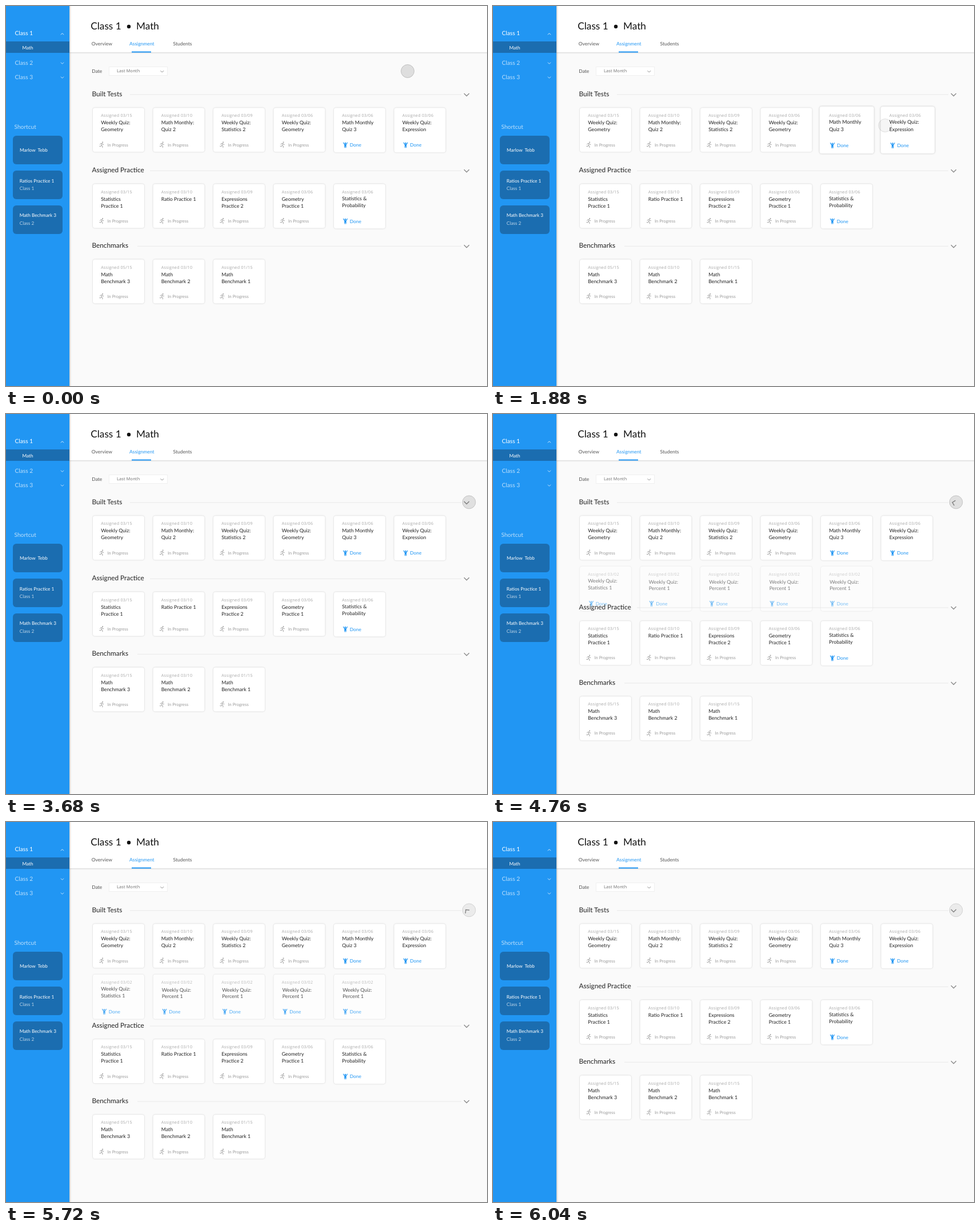
An HTML page that plays this animation: 842 by 665 pixels, repeating every 6.32 s.

```html
<!DOCTYPE html>
<html lang="en">
<head>
<meta charset="utf-8">
<title>Assignments</title>
<style>
  html, body { margin: 0; width: 100%; height: 100%; overflow: hidden; background: #fafafa; }
  svg { display: block; }
  text { font-family: Lato, sans-serif; white-space: pre; text-rendering: geometricPrecision; }
  .date { font: 7.2px "Open Sans", sans-serif; letter-spacing: .25px; fill: #a6a6a6; }
  .title { font-size: 8.8px; fill: #222; }
  .status { font-size: 7.5px; fill: #999; }
  .done { font-size: 8.4px; fill: #2196f3; }
  .heading { font-size: 11.8px; fill: #222; }
  .tab { font-size: 8.5px; fill: #555; }
  .nav { font-size: 10.2px; fill: #fff; }
  .item { font-size: 8.25px; fill: #fff; }
  .dim { fill-opacity: .7; }
  .box { fill: #fff; filter: drop-shadow(0 .5px 1.2px rgba(0, 0, 0, .2)); }
  .chevron { fill: none; stroke: #8c8c8c; stroke-width: 1.4; }
</style>
</head>
<body>
<svg id="stage" width="842" height="665" viewBox="0 0 842 665"></svg>
<script>
const LOOP = 6320, STEP = 40, ROW = 88, PITCH = 105.5;
const BLUE = '#2196f3', DEEP = '#1b6db0';

const text = (x, y, cls, str, extra = '') => `<text x="${x}" y="${y}" class="${cls}" ${extra}>${str}</text>`;
const rect = (x, y, w, h, fill, extra = '') =>
  `<rect x="${x}" y="${y}" width="${w}" height="${h}" fill="${fill}" ${extra}/>`;
const chevron = (x, y, r, extra = '') =>
  `<g transform="translate(${x} ${y})"><path class="chevron" d="M${-r} ${-r / 2}L0 ${r / 2}L${r} ${-r / 2}" ${extra}/></g>`;

const runner = (x, y) => `<g transform="translate(${x} ${y})" fill="none" stroke="#999" stroke-width=".9">
  <circle cx="1.6" cy="-4.2" r="1" fill="#999" stroke="none"/>
  <path d="M.8-2.2L-.6 1L1.4 2.2V5.2M-.6 1L-1.5 2.9L-4.2 2.5M-3-.3L-1.7-2.2H.8L2-.5H3.8"/></g>`;
const cheer = (x, y) => `<g transform="translate(${x} ${y})" fill="${BLUE}" stroke="${BLUE}">
  <circle cy="-3.3" r="1.2" stroke="none"/>
  <path fill="none" stroke-width="1.2" d="M-3.6-4.6L-1.6-1.2H1.6L3.6-4.6M-1 1V5M1 1V5"/>
  <path stroke="none" d="M-1.6-1.6H1.6V2.4H-1.6Z"/></g>`;

// A card is [date, first line, second line, done?, title shift x, title shift y]
function card([date, first, second, done, dx = 0, dy = 0], col, y, id = '') {
  const x = 152 + col * PITCH, top = y + (done ? 28.2 : 29) + dy;
  return `<g ${id && `id="${id}"`}>
    <rect class="box" x="${x}" y="${y}" width="90" height="${done ? 78 : 77}" rx="4"/>
    <g>${text(x + 14.3, y + 16, 'date', 'Assigned ' + date)}
    ${text(x + 14.2 + dx, top, 'title', first)}${text(x + 14.2 + dx, top + (dx ? 11 : 12), 'title', second)}
    ${done ? cheer(x + 20, y + 65) + text(x + 27.7, y + 68, 'done', 'Done')
           : runner(x + 15.5, y + 64.5) + text(x + 25.5, y + 67.2, 'status', 'In Progress')}</g></g>`;
}

const section = (y, name, lineX, cards, arrowId) =>
  rect(lineX, y + 154.5, 585 - lineX + 212, 1, '#e9e9e9') +
  text(150.5, y + 158, 'heading', name) +
  chevron(806.3, y + 155.3, 4.5, arrowId && `id="${arrowId}"`) +
  cards.map((c, i) => card(c, i, y + 178.3, arrowId && i > 3 ? 'card' + i : '')).join('');

const tests = [
  ['03/15', 'Weekly Quiz:', 'Geometry'], ['03/10', 'Math Monthly:', 'Quiz 2'],
  ['03/09', 'Weekly Quiz:', 'Statistics 2'], ['03/06', 'Weekly Quiz:', 'Geometry'],
  ['03/06', 'Math Monthly', 'Quiz 3', true], ['03/06', 'Weekly Quiz:', 'Expression', true]];
const practice = [
  ['03/15', 'Statistics', 'Practice 1'], ['03/10', 'Ratio Practice 1', ''],
  ['03/09', 'Expressions', 'Practice 2'], ['03/06', 'Geometry', 'Practice 1'],
  ['03/06', 'Statistics &amp;', 'Probability', true]];
const benchmarks = [['05/15', 3], ['03/10', 2], ['01/15', 1]].map(([d, n]) => [d, 'Math', 'Benchmark ' + n]);
const older = [['03/02', 'Weekly Quiz:', 'Statistics 1', true],
  ...Array(4).fill(['03/02', 'Weekly Quiz:', 'Percent 1', true, 1, 2.4])];

const navArrow = (y, flip, alpha) => chevron(98.5, y, 2.6,
  `style="stroke:#fff;stroke-width:.9;stroke-opacity:${alpha}" transform="scale(1 ${flip})"`);
const shortcut = y => rect(12, y, 87, 50, DEEP, 'rx="6"');

const $ = id => document.getElementById(id);
$('stage').innerHTML =
  rect(0, 0, 842, 665, '#fafafa') +
  rect(111, -5, 740, 86, '#fff', 'style="filter:drop-shadow(0 1px 1px rgba(0,0,0,.16))"') +
  text(148.3, 41, '', 'Class 1', 'font-size="17.2" fill="#111"') +
  '<circle cx="215" cy="36" r="3.2" fill="#111"/>' +
  text(228, 41, '', 'Math', 'font-size="17.2" fill="#111"') +
  text(149.7, 69, 'tab', 'Overview') +
  text(216, 69, 'tab', 'Assignment', `style="fill:${BLUE}"`) +
  text(292.5, 69, 'tab', 'Students') +
  rect(220, 79.5, 34, 2, BLUE) +
  text(150.3, 117.2, 'tab', 'Date') +
  rect(180.5, 106.5, 102, 15, '#fff', 'stroke="#f0f0f0"') +
  text(194, 116.3, '', 'Last Month',
    'style="font:7.3px Open Sans,sans-serif;letter-spacing:.2px" fill="#666"') +
  chevron(273.3, 114.6, 2.8, 'style="stroke-width:1"') +
  section(0, 'Built Tests', 217, tests, 'arrow') +
  `<g id="older">${older.map((c, i) => card(c, i, 266.7)).join('')}</g>
   <g id="lower">${section(133.3, 'Assigned Practice', 252, practice, '')}
   ${section(265.3, 'Benchmarks', 230, benchmarks, '')}</g>` +
  rect(-5, -5, 116, 680, BLUE, 'style="filter:drop-shadow(1px 0 1.5px rgba(0,0,0,.25))"') +
  rect(0, 62, 111, 20, DEEP) +
  text(15.5, 51.3, 'nav', 'Class 1') + navArrow(49, -1, .9) +
  text(28.5, 75.6, 'item', 'Math') +
  text(15.5, 103, 'nav dim', 'Class 2') + navArrow(100, 1, .8) +
  text(15.5, 128, 'nav dim', 'Class 3') + navArrow(125, 1, .8) +
  text(14.5, 215, 'nav dim', 'Shortcut') +
  shortcut(227) + text(24, 255, 'item', 'Marlow  Tebb') +
  shortcut(288) + text(23.7, 308.5, 'item', 'Ratios Practice 1') + text(23.7, 321.8, 'item dim', 'Class 1') +
  shortcut(349) + text(23.7, 369.3, 'item', 'Math Bechmark 3') + text(23.7, 382.8, 'item dim', 'Class 2') +
  '<circle id="cursor" r="11.5" stroke="#000" stroke-width=".9"/>';

const span = (t, from, len) => Math.min(1, Math.max(0, (t - from) / len));
const smooth = k => k * k * (3 - 2 * k);
const inOut = k => k < .5 ? 8 * k ** 4 : 1 - 8 * (1 - k) ** 4;
const mix = (a, b, k) => a + (b - a) * k;

// The standard "ease" curve, cubic-bezier(.25, .1, .25, 1)
function ease(k) {
  let lo = 0, hi = 1;
  for (let i = 0; i < 20; i++) {
    const s = (lo + hi) / 2;
    if (.75 * s * (1 - s) + s ** 3 < k) lo = s; else hi = s;
  }
  return .3 * lo * (1 - lo) ** 2 + 3 * lo * lo * (1 - lo) + lo ** 3;
}

function hover(col, k, shift) {
  const [box, label] = $('card' + col).children, x = 152 + col * PITCH, y = 178.3;
  const set = (name, value) => box.setAttribute(name, value);
  set('x', x + (shift - 5.5) * k);
  set('y', y - 5.8 * k);
  set('width', 90 + 12 * k);
  set('height', 78 + 10.5 * k);
  box.style.filter = `drop-shadow(0 ${.5 + .5 * k}px ${1.2 + .8 * k}px rgba(0,0,0,${.2 + .1 * k}))`;
  const cx = x + 16, cy = y + 32;
  label.setAttribute('transform', `translate(${cx} ${cy}) scale(${1 + .05 * k}) translate(${-cx} ${-cy})`);
}

function draw(t) {
  const a = inOut(span(t, 0, 1000)), b = inOut(span(t, 1440, 900)), c = inOut(span(t, 2560, 1080));
  const x = 703 - 65 * a + 106 * b + 66.5 * c, y = 114 + 95 * a - 54.7 * c;
  const alpha = t >= 5320 ? .06 : mix(mix(.11, .04, a), .1, c);
  const cursor = $('cursor');
  cursor.setAttribute('transform', `translate(${x} ${y})`);
  cursor.setAttribute('fill-opacity', alpha);
  cursor.setAttribute('stroke-opacity', .08 + alpha);

  hover(4, smooth(span(t, 480, 460)) - smooth(span(t, 1640, 440)), 0);
  hover(5, smooth(span(t, 1680, 480)) - smooth(span(t, 2760, 440)), 3.2);

  const open = ease(span(t, 4640, 360)) - ease(span(t, 5657, 380));
  $('arrow').setAttribute('transform', `rotate(${180 * open})`);
  $('older').setAttribute('opacity', open);
  $('lower').setAttribute('transform', `translate(0 ${ROW * open})`);
}

function frame() {
  const t = performance.now() % LOOP;
  draw(Math.floor(t / STEP) * STEP);
  requestAnimationFrame(frame);
}
frame();
</script>
</body>
</html>
```
